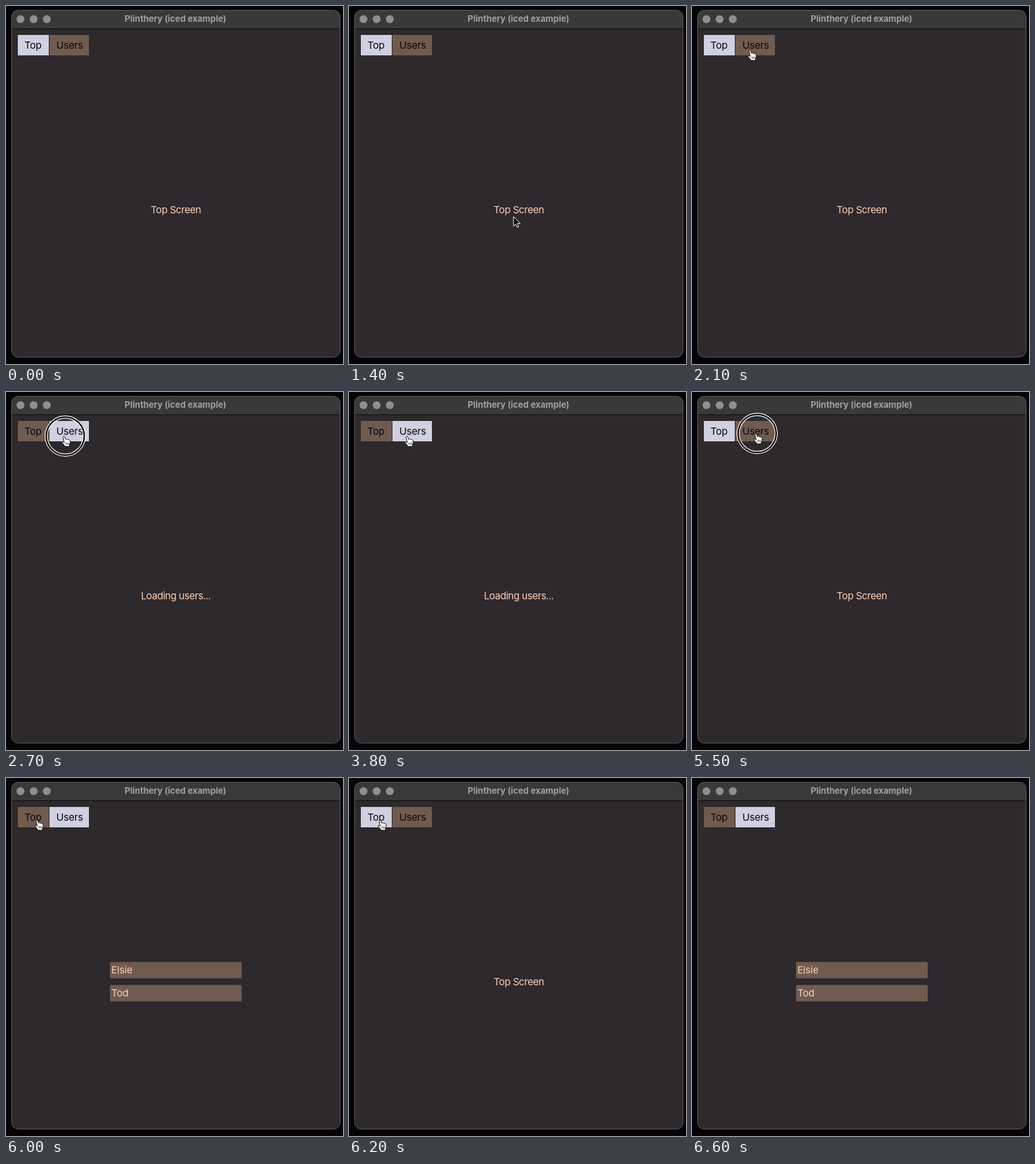
Recreate the animation shown at these times as an HTML page. Size 512x544 px, loop 7470 ms.

```html
<!DOCTYPE html>
<html lang="en">
<head>
<meta charset="utf-8">
<title>Tabs</title>
<style>
  html, body { margin: 0; width: 100%; height: 100%; overflow: hidden; background: #050508; }
  svg { display: block; width: 512px; height: 544px; }
  text { font: 400 15px Inter, "Open Sans", sans-serif; fill: #ffd0b5; letter-spacing: -.2px; }
  .title { font-weight: 700; font-size: 13px; fill: #a3a1a3; letter-spacing: 0; }
  .mid { text-anchor: middle; }
  .label { letter-spacing: -.45px; }
  .tab rect { fill: #6f5b50; }
  .tab.on rect { fill: #d0d0e0; }
  .tab text { fill: #080709; }
  .row { fill: #6f5b50; }
  .ring circle { fill: none; stroke: #fff; stroke-width: 1.2; }
  .ring .band { stroke: #000; stroke-width: 4; }
  .hand { fill: #fff; stroke: #000; stroke-width: .9; stroke-linejoin: round; }
  .arrow { fill: #000; stroke: #fff; stroke-width: 1; }
  [hidden] { display: none; }
</style>
</head>
<body>
<svg viewBox="0 0 512 544">
  <rect width="512" height="544" fill="#050508"/>
  <rect x="8.5" y="6.5" width="499" height="527" rx="10" fill="#2d292c"/>
  <path d="M8.5 34V16.5a10 10 0 0 1 10-10h479a10 10 0 0 1 10 10V34z" fill="#3a393a"/>
  <path d="M9 34.5H507" stroke="#0c0b0c"/>
  <rect x="8.5" y="6.5" width="499" height="527" rx="10" fill="none" stroke="#5c5b5d"/>
  <g fill="#908e90">
    <circle cx="22" cy="20" r="6"/><circle cx="42" cy="20" r="6"/><circle cx="62" cy="20" r="6"/>
  </g>
  <text class="title mid" x="257.5" y="24">Plinthery (iced example)</text>

  <g class="tab" id="topTab"><rect x="18" y="44" width="47" height="31"/><text x="28" y="65">Top</text></g>
  <g class="tab" id="usersTab"><rect x="66" y="44" width="60" height="31"/><text x="76.5" y="65">Users</text></g>

  <text class="mid label" id="top" x="258" y="315">Top Screen</text>
  <text class="mid label" id="loading" x="258" y="315">Loading users...</text>
  <g id="list">
    <rect class="row" x="158" y="279.5" width="200" height="25" rx="1.5"/>
    <rect class="row" x="158" y="314.5" width="200" height="25" rx="1.5"/>
    <text x="160" y="297">Elsie</text>
    <text x="160" y="332">Tod</text>
  </g>

  <g id="pointer">
    <g class="ring" id="ring">
      <circle class="band" r="29"/><circle r="30.6"/><circle r="27.2"/>
    </g>
    <g class="hand" id="hand">
      <path d="M-3.2 1.6C-3.4 0-1.2-.2-.7 1.2L.6 5C1.2 4.3 2.6 4.2 3 5.2 3.7 4.7 5 4.9 5.3 5.9 6.3 5.5 7.3 6 7.4 7.2 7.6 10 7.3 11.5 6.4 13L6.2 15.8H-.2C-1.3 13.5-3.5 11.8-4.8 9.8-5.3 8.6-3.8 8-2.8 8.8L-1.6 9.8z"/>
      <path d="M1 9.8v3.4M3 9.8v3.4M5 9.8v3.4" stroke-width=".7"/>
    </g>
    <path class="arrow" id="arrow" d="M0 0V14.5L3.4 11.4 5.6 16.4 7.8 15.4 5.6 10.6H10.2z"/>
  </g>
</svg>
<script>
const LOOP = 7470, STEP = 100;
const el = id => document.getElementById(id);
const show = (id, on) => el(id).toggleAttribute('hidden', !on);

// [time, screen, pointer x, pointer y, pressed]; no x means no pointer
const cues = [
  [0, 'top'],
  [1400, 'top', 250, 320],
  [2100, 'top', 90, 67],
  [2500, 'top', 90, 67, 1],
  [2600, 'loading', 90, 67, 1],
  [2800, 'loading', 90, 67],
  [4600, 'list', 82, 66],
  [4700, 'list', 58, 63],
  [4800, 'list', 43, 62],
  [5100, 'list', 44, 62],
  [5200, 'list', 49, 63, 1],
  [5300, 'top', 49, 63, 1],
  [5400, 'top', 84, 63],
  [5500, 'top', 99, 63, 1],
  [5600, 'list', 99, 63, 1],
  [5700, 'list', 97, 63],
  [5800, 'list', 84, 63],
  [5900, 'list', 60, 63],
  [6000, 'list', 49, 63.5],
  [6100, 'list', 49, 63.5, 1],
  [6200, 'top', 49, 63.5],
  [6400, 'top', 92, 64],
  [6500, 'list', 92, 64],
  [6600, 'list']
];

function draw(now) {
  const t = Math.floor(now % LOOP / STEP) * STEP;
  let [, screen, x, y, pressed] = cues.findLast(c => c[0] <= t);
  if (t >= 1400 && t < 2100) {
    const left = (1 - (t - 1400) / 700) ** 2;
    x = 90 + 160 * left;
    y = 67 + 253 * left;
  }
  for (const id of ['top', 'loading', 'list']) show(id, id === screen);
  el('topTab').classList.toggle('on', screen === 'top');
  el('usersTab').classList.toggle('on', screen !== 'top');

  const visible = x !== undefined;
  show('pointer', visible);
  if (visible) {
    const overTab = x >= 18 && x <= 126 && y >= 44 && y <= 75;
    el('pointer').setAttribute('transform', `translate(${x} ${y})`);
    show('hand', overTab);
    show('arrow', !overTab);
    show('ring', pressed);
  }
}

function tick() {
  draw(performance.now());
  requestAnimationFrame(tick);
}
tick();
</script>
</body>
</html>
```
